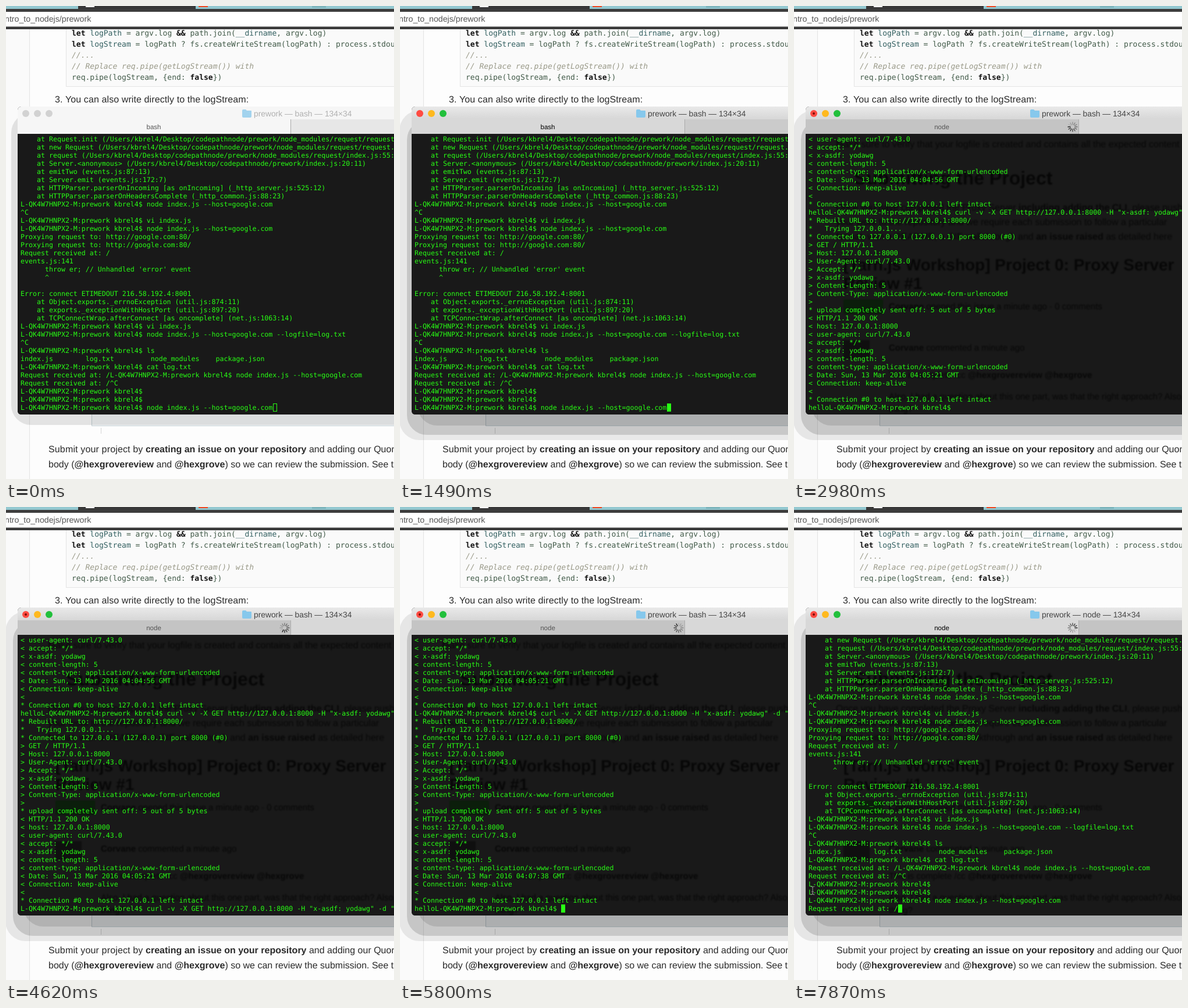
An HTML page that plays this animation: 667x814 px, repeating every 8000 ms.

```html
<!DOCTYPE html>
<html lang="en">
<head>
<meta charset="utf-8">
<title>Terminal proxy demo</title>
<style>
html, body { margin: 0; width: 100%; height: 100%; overflow: hidden; background: #fdfdfd; }
#stage { position: relative; width: 667px; height: 814px; overflow: hidden; background: #fdfdfd;
  font: 16px/20px "Liberation Sans", Arial, sans-serif; color: #2a2a2a; text-rendering: geometricPrecision; }
#stage div, #stage svg, #stage pre { position: absolute; margin: 0; white-space: pre; }
.code { left: 113px; font: 13px/19px "DejaVu Sans Mono", monospace; color: #415a48; }
.code b { color: #111; }
.code i { color: #999988; }
.code u { color: #325f60; text-decoration: none; }
.band { right: -60px; border-radius: 34px; }
#win { left: 20px; top: 173px; width: 700px; height: 530px; border-radius: 6px; overflow: hidden; background: #191919; }
#bar { left: 0; top: 0; width: 700px; height: 23px; }
.tab { top: 22px; height: 25px; box-sizing: border-box; }
#tabA { left: 0; width: 470px; border-right: 1px solid #aaa; }
#tabB { left: 470px; width: 230px; }
#label { left: 0; width: 468px; top: 26px; text-align: center; font-size: 11.5px; }
#title { left: 406px; top: 3px; font-size: 13.8px; }
#lights { left: 0; top: 0; }
.light { top: 6px; width: 12px; height: 12px; border-radius: 50%; }
#ghost { left: -20px; top: -173px; width: 667px; height: 703px; color: #000; filter: blur(1.1px); opacity: .72; font-size: 15px; }
#ghost .p { font-size: 16px; }
#ghost .h { font-weight: bold; font-size: 28px; }
#ghost .big { font-weight: bold; font-size: 32px; }
#rows { left: 5px; top: 49px; color: #28fe14; font: 11.627px/14px "DejaVu Sans Mono", monospace; }
#cursor { width: 7px; height: 14px; box-sizing: border-box; border: 1px solid #28fe14; }
</style>
</head>
<body>
<div id="stage">
  <!-- browser chrome -->
  <div style="left:0;top:0;width:667px;height:11px;background:#e4e4e4"></div>
  <div style="left:0;top:0;width:667px;height:5px;background:#93c8d0"></div>
  <div style="left:124px;top:0;width:202px;height:6px;background:#383838"></div>
  <div style="left:137px;top:0;width:15px;height:2px;background:#fff"></div>
  <div style="left:331px;top:0;width:16px;height:2px;background:#ee4b26"></div>
  <div style="left:526px;top:0;width:24px;height:3px;background:#7cb4bb"></div>
  <div style="left:0;top:5px;width:667px;height:5px;background:#3d3d3d"></div>
  <div style="left:0;top:10px;width:667px;height:25px;background:#fff;border-bottom:1px solid #999"></div>
  <div style="left:0;top:36px;width:667px;height:4px;background:#393939"></div>
  <div style="left:-2px;top:13px;font-size:14.2px;color:#555">ntro_to_nodejs/prework</div>

  <!-- page -->
  <div style="left:0;top:40px;width:40px;height:774px;background:#fafafa;border-right:1px solid #e3e3e3"></div>
  <div style="left:103px;top:40px;width:600px;height:98px;background:#fafafa;border:solid #e4e4e4;border-width:0 0 1px 1px"></div>
  <div class="code" style="top:38px"><b>let</b> <u>logPath</u> = argv.log <b>&amp;&amp;</b> path.join(<u>__dirname</u>, argv.log)
<b>let</b> <u>logStream</u> = logPath ? fs.createWriteStream(logPath) : process.stdout
<i>//...</i>
<i>// Replace req.pipe(getLogStream()) with</i>
req.pipe(logStream, {end: <b>false</b>})</div>
  <div style="left:84px;top:152px">3.</div>
  <div style="left:102px;top:152px;letter-spacing:.1px">You can also write directly to the logStream:</div>
  <div style="left:147px;top:680px;width:560px;height:41px;background:#f4f6f7;border:1px solid #c3cfd4"></div>
  <div style="left:163px;top:726px;width:1px;height:10px;background:#d5d5d5"></div>
  <div style="left:73px;top:754px;letter-spacing:.15px">Submit your project by </div>
  <div style="left:240px;top:754px"><b>creating an issue on your repository</b> and adding our Quonda</div>
  <div style="left:73px;top:780px">body (<b>@hexgrovereview</b> and <b>@hexgrove</b>) so we can review the submission. See the</div>

  <div id="idleShade"><div class="band" style="left:9px;top:184px;width:720px;height:537px;background:#0000001a"></div></div>
  <div id="liveShade">
    <div class="band" style="left:-1px;top:180px;width:720px;height:567px;background:#00000014"></div>
    <div class="band" style="left:12px;top:196px;width:720px;height:542px;background:#00000024"></div>
    <div class="band" style="left:30px;top:210px;width:720px;height:512px;background:#0000001c"></div>
  </div>

  <div id="win">
    <div id="bar"></div>
    <div class="tab" id="tabA"></div>
    <div class="tab" id="tabB"></div>
    <div id="hover" style="left:470px;top:23px;width:53px;height:17px;background:#bfbfbf"></div>
    <div id="label"></div>
    <div id="lights"></div>
    <svg id="folder" style="left:386px;top:5px" width="17" height="14"><path d="M0 2q0-2 2-2h4l2 2h7q1 0 1 1v9q0 2-2 2H2q-2 0-2-2z" fill="#86c8ec"/></svg>
    <div id="title"></div>
    <svg id="spin" style="left:450px;top:26px" width="18" height="18" viewBox="-9 -9 18 18"></svg>
    <div style="left:0;top:47px;width:700px;height:483px;background:#191919"></div>
    <div id="ghost"></div>
    <pre id="rows"></pre>
    <div id="cursor"></div>
  </div>
  <svg id="mouse" width="10" height="16" viewBox="-5 -8 10 16" fill="none" stroke="#8a8a8a" stroke-width="1.2"><path d="M-3.5-7Q0-7 0-5Q0-7 3.5-7M0-5V5M-3.5 7Q0 7 0 5Q0 7 3.5 7M-2 2H2"/></svg>
</div>

<script>
const $ = id => document.getElementById(id);
const LOOP = 8000;
const prompt = "L-QK4W7HNPX2-M:prework kbrel4$ ";
const home = "/Users/kbrel4/Desktop/codepathnode/prework/";
const req = home + "node_modules/request/";
const run = prompt + "node index.js --host=google.com";
const got = "Request received at: /";

const shell = [
  `    at Request.init (${req}request.js:476:10)`,
  `    at new Request (${req}request.js:130:8)`,
  `    at request (${req}index.js:55:10)`,
  `    at Server.<anonymous> (${home}index.js:20:11)`,
  "    at emitTwo (events.js:87:13)",
  "    at Server.emit (events.js:172:7)",
  "    at HTTPParser.parserOnIncoming [as onIncoming] (_http_server.js:525:12)",
  "    at HTTPParser.parserOnHeadersComplete (_http_common.js:88:23)",
  run, "^C",
  prompt + "vi index.js",
  run,
  "Proxying request to: http://google.com:80/",
  "Proxying request to: http://google.com:80/",
  got,
  "events.js:141",
  "      throw er; // Unhandled 'error' event",
  "      ^",
  "",
  "Error: connect ETIMEDOUT 216.58.192.4:8001",
  "    at Object.exports._errnoException (util.js:874:11)",
  "    at exports._exceptionWithHostPort (util.js:897:20)",
  "    at TCPConnectWrap.afterConnect [as oncomplete] (net.js:1063:14)",
  prompt + "vi index.js",
  run + " --logfile=log.txt",
  "^C",
  prompt + "ls",
  ["index.js", "log.txt", "node_modules", "package.json"].map(s => s.padEnd(16)).join(""),
  prompt + "cat log.txt",
  got + run,
  got + "^C",
  prompt, prompt, run
];
const served = last => [...shell.slice(1), last];

const curl = prompt + 'curl -v -X GET http://127.0.0.1:8000 -H "x-asdf: yodawg" -d "hello"';
const reply = time => [
  "< user-agent: curl/7.43.0",
  "< accept: */*",
  "< x-asdf: yodawg",
  "< content-length: 5",
  "< content-type: application/x-www-form-urlencoded",
  `< Date: Sun, 13 Mar 2016 ${time} GMT`,
  "< Connection: keep-alive",
  "<",
  "* Connection #0 to host 127.0.0.1 left intact"
];
const call = [
  "* Rebuilt URL to: http://127.0.0.1:8000/",
  "*   Trying 127.0.0.1...",
  "* Connected to 127.0.0.1 (127.0.0.1) port 8000 (#0)",
  "> GET / HTTP/1.1",
  "> Host: 127.0.0.1:8000",
  "> User-Agent: curl/7.43.0",
  "> Accept: */*",
  "> x-asdf: yodawg",
  "> Content-Length: 5",
  "> Content-Type: application/x-www-form-urlencoded",
  ">",
  "* upload completely sent off: 5 out of 5 bytes",
  "< HTTP/1.1 200 OK",
  "< host: 127.0.0.1:8000"
];
const client = (t1, cmd, t2, last) => [...reply(t1), cmd, ...call, ...reply(t2), last];
const before = last => client("04:04:56", "hello" + curl, "04:05:21", last);
const after = client("04:05:21", curl, "04:07:38", "hello" + prompt);

// at: start, rows: text, tab: active tab, job: left tab label, blink: when the cursor turns on
const scenes = [
  { at: 0, rows: shell, tab: 0, job: "bash", col: 62, blink: 590 },
  { at: 1640, rows: served(""), tab: 0, job: "bash", col: 0, blink: 1640 },
  { at: 1790, rows: served(""), tab: 0, job: "node", col: 0, blink: 1790 },
  { at: 2240, rows: before("hello" + prompt), tab: 1, job: "node", col: 36, blink: 2240 },
  { at: 3130, rows: before("hello" + curl), tab: 1, job: "node", col: 99, blink: 3130 },
  { at: 3580, rows: before(curl), tab: 1, job: "node", col: 98, blink: 3580 },
  { at: 4770, rows: after, tab: 1, job: "node", col: 36, blink: 4770 },
  { at: 6250, rows: served(got), tab: 0, job: "node", col: 22, blink: 5800 }
];

// Page showing faintly through the terminal: x, y, text, class
const veil = [
  [72, 239, "Make sure to verify that your logfile is created and contains all the expected content", "p"],
  [103, 296, "Submitting the Project", "big"],
  [72, 348, "Once you have completed the Proxy Server <b>including adding the CLI</b>, please push", "p"],
  [72, 373, "your work to the repository and we require each submission to follow a particular", "p"],
  [72, 398, "format, with a README, a GIF walkthrough and <b>an issue raised</b> as detailed here", "p"],
  [85, 446, "[Tarn.js Workshop] Project 0: Proxy Server", "h"],
  [85, 478, "Review #1", "h"],
  [163, 518, "<b>Corvane</b> opened this issue a minute ago · 0 comments"],
  [163, 589, "<b>Corvane</b> commented a minute ago"],
  [163, 636, "This is complete /cc <b>@hexgrovereview @hexgrove</b>"],
  [163, 673, "Also, I had a question about this one part, was that the right approach? Also, how"],
  [163, 695, "thing?"]
];
$("ghost").innerHTML =
  '<div style="left:85px;top:505px;width:68px;height:25px;background:#062006"></div>' +
  '<div style="left:85px;top:575px;width:45px;height:32px;background:#0008"></div>' +
  veil.map(([x, y, s, c = ""]) =>
    `<div class="${c}" style="left:${x}px;top:${y - 10}px">${s}</div>`).join("");
const firstVeil = $("ghost").children[2];

const hues = ["#ff4b42", "#ffb91f", "#22c03c"];
$("lights").innerHTML = hues.map((c, i) => `<div class="light" style="left:${8 + 20 * i}px"></div>`).join("") +
  '<div style="left:12px;top:10px;width:4px;height:4px;border-radius:50%;background:#7c0d08"></div>';
const lamps = [...$("lights").children], dot = lamps.pop();

$("spin").innerHTML = Array.from({ length: 12 }, (_, i) =>
  `<path d="M0-4V-8" stroke="#222" stroke-width="1.4" stroke-linecap="round" opacity="${.15 + .85 * i / 11}" transform="rotate(${30 * i})"/>`).join("");

const show = (id, on) => $(id).style.visibility = on ? "visible" : "hidden";
const paint = (id, bg) => $(id).style.background = bg;

// Mouse path: time, x, y
const path = [[7430, 120, 744], [7580, 70, 705], [7720, 32, 660]];
let shown;

function render(t) {
  const s = scenes.filter(k => k.at <= t).pop();
  const live = t >= 290, busy = t >= 2090, glass = t >= 1640;

  if (shown !== s) {
    shown = s;
    $("rows").textContent = s.rows.join("\n");
    $("label").textContent = s.job;
    $("title").textContent = `prework — ${s.tab ? "bash" : s.job} — 134×34`;
    $("cursor").style.left = 5 + 7 * s.col + "px";
    $("cursor").style.top = 49 + 14 * 33 + "px";
  }

  show("idleShade", !live);
  show("liveShade", live);
  paint("bar", live ? "linear-gradient(#e9e9e9,#d6d6d6)" : "#f6f6f6");
  const on = live ? "#d8d8d8" : "#f6f6f6", off = live ? "#c4c4c4" : "#e7e7e7";
  paint("tabA", s.tab ? off : on);
  paint("tabB", s.tab ? on : t < 2090 && live ? "#cbcbcb" : off);
  show("hover", busy && t < 2240);
  $("label").style.color = live && !s.tab ? "#000" : "#555";
  $("title").style.color = live ? "#444" : "#b0b0b0";
  $("folder").style.opacity = live ? 1 : .75;
  lamps.forEach((el, i) => el.style.background = live ? hues[i] : "#d2d2d2");
  dot.style.visibility = s.job === "node" ? "visible" : "hidden";

  show("spin", busy);
  $("spin").style.transform = `rotate(${60 * Math.floor((t - 2090) / 149)}deg)`;

  show("ghost", glass);
  firstVeil.style.display = s.tab ? "" : "none";

  const lit = (t - s.blink + 900) % 900 < 450;
  show("cursor", !live || (lit && t >= 590));
  paint("cursor", live ? "#28fe14" : "none");

  const spot = path.filter(p => p[0] <= t).pop();
  show("mouse", !!spot);
  if (spot) {
    $("mouse").style.left = spot[1] - 5 + "px";
    $("mouse").style.top = spot[2] - 8 + "px";
  }
}

const start = performance.now();
function tick() {
  render((performance.now() - start) % LOOP);
  requestAnimationFrame(tick);
}
tick();
</script>
</body>
</html>
```
